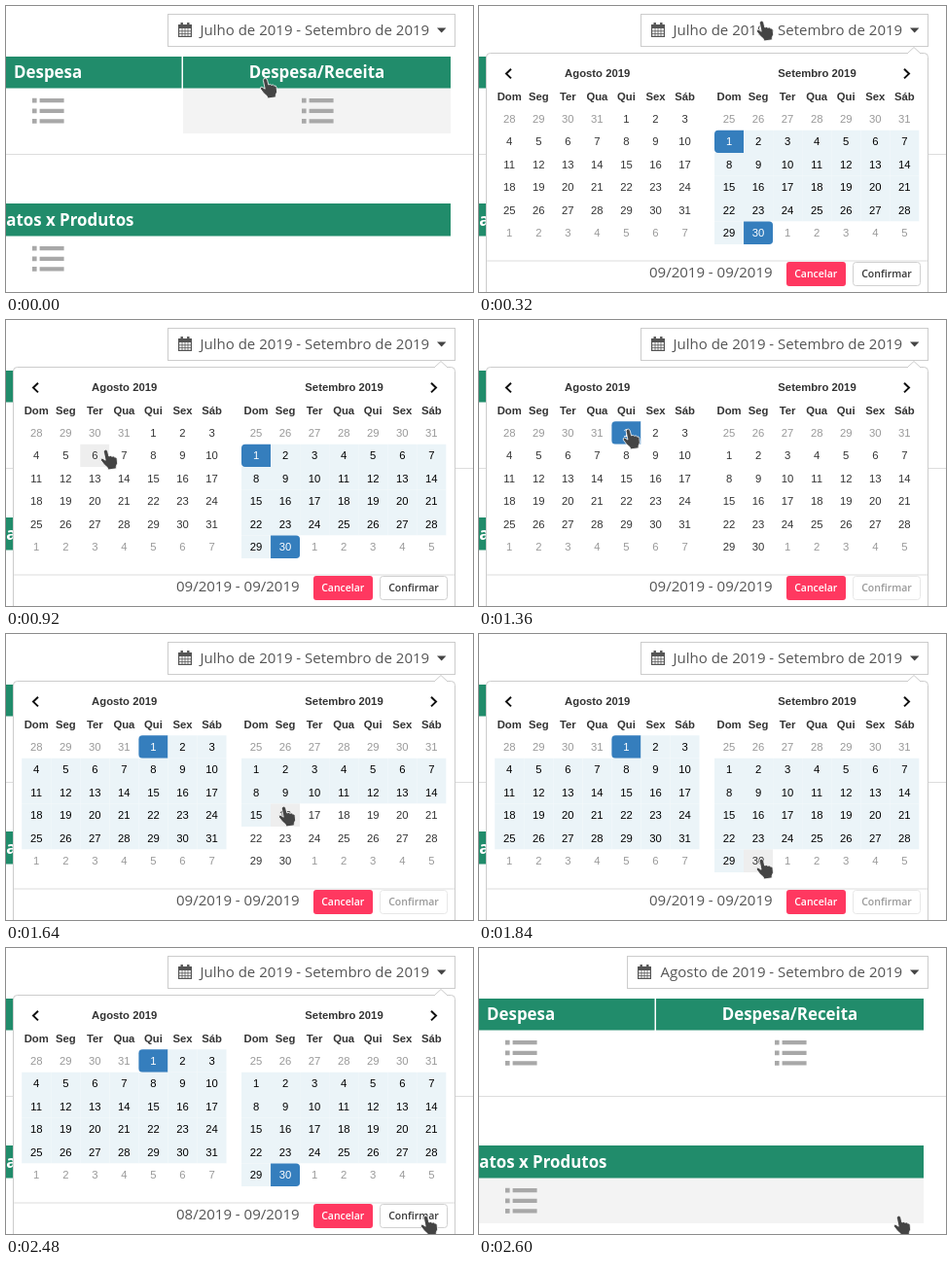
These frames come from a looping animation (480 by 294 pixels, 2720 ms). An HTML page:

```html
<!DOCTYPE html>
<html lang="pt">
<head>
<meta charset="utf-8">
<style>
html, body { margin: 0; width: 100%; height: 100%; overflow: hidden; background: #fff; }
svg { display: block; width: 100vw; height: 100vh; }
text { font-family: "Open Sans", "Noto Sans", sans-serif; }
.label { font-size: 15px; fill: #555; }
.head { font-size: 16.9px; font-weight: 700; fill: #fff; }
.cal text { font-family: "Liberation Sans", Arial, sans-serif; font-size: 11.3px; text-anchor: middle; fill: #333; }
.cal .bold { font-weight: 700; }
.action { font-size: 10.5px; font-weight: 600; text-anchor: middle; }
</style>
</head>
<body>
<svg id="stage" viewBox="0 0 480 294" preserveAspectRatio="none">
  <defs>
    <g id="list" fill="#a8a8a8">
      <path d="M27 94.7h4.6v4.8h-4.6zM27 105.4h4.6v4.8h-4.6zM27 116h4.6v4.8h-4.6z"/>
      <path d="M34.6 95h25v4.2h-25zM34.6 105.7h25v4.2h-25zM34.6 116.3h25v4.2h-25z"/>
    </g>
  </defs>
  <rect width="480" height="294" fill="#fff"/>
  <rect id="topHover" x="182" y="84" width="275" height="47" fill="#f3f3f3"/>
  <rect id="lowHover" y="236" width="457" height="47" fill="#f3f3f3"/>
  <path d="M0 52h180.5v32.5H0zM182 52h275v32.5H182zM0 203h457v33.5H0z" fill="#218c6b"/>
  <path d="M0 152.5H480" stroke="#ddd"/>
  <text class="head" x="8" y="74">Despesa</text>
  <text class="head" x="319.5" y="74" text-anchor="middle">Despesa/Receita</text>
  <text class="head" x="131.5" y="226" text-anchor="end">Contratos x Produtos</text>
  <use href="#list"/>
  <use href="#list" x="277"/>
  <use href="#list" y="152"/>

  <rect id="field" y="8.5" height="33" fill="#fff" stroke="#ccc"/>
  <g id="icon">
    <path d="M177.6 20h12.8v11.4h-12.8z" fill="none" stroke="#555" stroke-width="1.2"/>
    <path d="M177 19h14v4h-14zM179.5 17h2.4v4h-2.4zM186.1 17h2.4v4h-2.4z" fill="#555"/>
    <path d="M181 23v8M184 23v8M187 23v8M178 25.8h12M178 28.6h12" stroke="#555" stroke-width=".8"/>
  </g>
  <text id="period" class="label" x="435.2" y="30" text-anchor="end"></text>
  <path d="M443 22.5h9.4l-4.7 5z" fill="#444"/>

  <g id="popup">
    <rect x="7.5" y="48.5" width="454" height="270" rx="4" fill="#fff" stroke="#ccc"/>
    <path d="M440 49l7-6.5 7 6.5" fill="#fff" stroke="#ccc"/>
    <path d="M33 64.8l-5 4.8 5 4.8M437 64.8l5 4.8-5 4.8" fill="none" stroke="#111" stroke-width="2"/>
    <g id="cal" class="cal"></g>
    <path d="M8 262H461" stroke="#ddd"/>
    <text id="range" class="label" x="175" y="279"></text>
    <rect x="316" y="263" width="61" height="25" rx="3" fill="#ff3860"/>
    <text class="action" x="346.3" y="279.3" fill="#fff">Cancelar</text>
    <g id="confirm">
      <rect x="384.5" y="263.5" width="69" height="24" rx="3" fill="#fff" stroke="#d0d0d0"/>
      <text class="action" x="419" y="279.3" fill="#363636">Confirmar</text>
    </g>
  </g>

  <path id="hand" fill="#444" stroke="#fff" stroke-width=".8" stroke-linejoin="round"
    d="M-2.6 1.4Q-2.4-.9-.4-.8Q1.2-.6 1.6 1.2L2.8 6Q4.8 4.8 5.8 6.3Q7.8 5.4 8.7 7Q10.7 6.5 11.1 8.6L11.6 13.2L10.3 16.4V18.8L2 20L1.4 17.8L-2.2 14.6L-5.5 10.2Q-6 8.2-4 8.1L-.8 10.2Z"/>
</svg>
<script>
const LOOP = 2720, STEP = 40;
const COL = 30.05, ROW = 23.45, TOP = 104.2;
const OPEN = 240, FIRST_CLICK = 1160, SECOND_CLICK = 2040, CLOSE = 2520;
const AUG1 = 1, SEP1 = 32, SEP30 = 61;
const $ = id => document.getElementById(id);

function add(tag, attrs, content = '') {
  const el = document.createElementNS('http://www.w3.org/2000/svg', tag);
  for (const k in attrs) el.setAttribute(k, attrs[k]);
  el.textContent = content;
  return $('cal').appendChild(el);
}

// Days are counted from 1 August; each month knows its grid position.
const months = [
  { name: 'Agosto 2019', x: 16.2, mid: 121.7, lead: 4, size: 31, base: 0 },
  { name: 'Setembro 2019', x: 242, mid: 347.5, lead: 7, size: 30, base: 31 }
];
const cells = [];
for (const m of months) {
  add('text', { x: m.mid, y: 73.3, class: 'bold' }, m.name);
  ['Dom', 'Seg', 'Ter', 'Qua', 'Qui', 'Sex', 'Sáb'].forEach((d, i) =>
    add('text', { x: m.x + COL * (i + .5), y: 96.6, class: 'bold' }, d));
  for (let i = 0; i < 42; i++) {
    const n = i - m.lead + 1;
    const x = m.x + COL * (i % 7), y = TOP + ROW * Math.floor(i / 7);
    const box = add('path', {});
    const label = n < 1 ? n + 31 : n > m.size ? n - m.size : n;
    const text = add('text', { x: x + COL / 2, y: y + 15.7 }, label);
    cells.push({ x, y, box, text, day: n + m.base, off: n < 1 || n > m.size });
  }
}

// Pointer stops: time, x, y of the fingertip.
const stops = [
  [0, 267, 75], [200, 291, 16], [320, 291, 16], [920, 103, 134], [1080, 148, 111],
  [1320, 148, 111], [1640, 286, 178], [1880, 291, 235], [2120, 291, 235],
  [2440, 432, 276], [LOOP, 432, 276]
];

// Monotone spline: at rest where the direction turns, flowing elsewhere.
const slope = (i, k) => (stops[i + 1][k] - stops[i][k]) / (stops[i + 1][0] - stops[i][0]);

function tangent(i, k) {
  if (i === 0 || i === stops.length - 1) return 0;
  const a = slope(i - 1, k), b = slope(i, k);
  return a * b > 0 ? 2 * a * b / (a + b) : 0;
}

function pointer(t) {
  const i = stops.findIndex(s => s[0] > t) - 1;
  const from = stops[i], to = stops[i + 1];
  const span = to[0] - from[0], p = (t - from[0]) / span, q = 1 - p;
  return [1, 2].map(k =>
    from[k] * q * q * (1 + 2 * p) + to[k] * p * p * (3 - 2 * p) +
    span * p * q * (tangent(i, k) * q - tangent(i + 1, k) * p));
}

const cellAt = ([x, y]) =>
  cells.find(c => x >= c.x && x < c.x + COL && y >= c.y && y < c.y + ROW);

// The last day the pointer entered stays the preview end across gaps.
function previewEnd(t) {
  for (let s = t; s >= FIRST_CLICK; s -= 20) {
    const c = cellAt(pointer(s));
    if (c) return c.day;
  }
  return AUG1;
}

function cellPath(x, y, l, r) {
  return `M${x + l} ${y}h${COL - l - r}q${r} 0 ${r} ${r}v${ROW - 2 * r}q0 ${r} ${-r} ${r}` +
    `h${l + r - COL}q${-l} 0 ${-l} ${-l}v${2 * l - ROW}q0 ${-l} ${l} ${-l}z`;
}

function drawDays(t, tip) {
  const picking = t >= FIRST_CLICK && t < SECOND_CLICK;
  const start = t < FIRST_CLICK ? SEP1 : AUG1;
  const end = picking ? previewEnd(t) : SEP30;
  const hover = cellAt(tip);
  for (const c of cells) {
    const first = !c.off && c.day === start;
    const last = !c.off && !picking && c.day === end;
    const inside = !c.off && c.day > start && c.day < end;
    const active = first || last;
    c.box.setAttribute('d', cellPath(c.x, c.y, first ? 4 : 0, last ? 4 : 0));
    c.box.setAttribute('fill', active ? '#357ebd' : c === hover && !c.off ? '#eee' : inside ? '#ebf4f8' : '#fff');
    c.text.style.fill = active ? '#fff' : c.off ? '#999' : inside ? '#000' : '#333';
  }
  $('range').textContent = (t < SECOND_CLICK ? '09' : '08') + '/2019 - 09/2019';
  $('confirm').setAttribute('opacity', picking ? .5 : 1);
}

const show = (id, on) => $(id).setAttribute('visibility', on ? 'visible' : 'hidden');

function render(t) {
  const tip = pointer(t), [x, y] = tip;
  const open = t >= OPEN && t < CLOSE, done = t >= CLOSE;
  const left = done ? 152.5 : 166.5;
  show('popup', open);
  show('topHover', !open && x > 182 && y > 52 && y < 131);
  show('lowHover', !open && x < 457 && y > 203 && y < 283);
  $('field').setAttribute('x', left);
  $('field').setAttribute('width', 461.5 - left);
  $('icon').setAttribute('transform', `translate(${left - 166.5})`);
  $('period').textContent = (done ? 'Agosto' : 'Julho') + ' de 2019 - Setembro de 2019';
  if (open) drawDays(t, tip);
  $('hand').setAttribute('transform', `translate(${x} ${y})`);
}

const begin = performance.now();
function tick() {
  const t = (performance.now() - begin) % LOOP;
  render(Math.floor(t / STEP) * STEP);
  requestAnimationFrame(tick);
}
tick();
</script>
</body>
</html>
```
